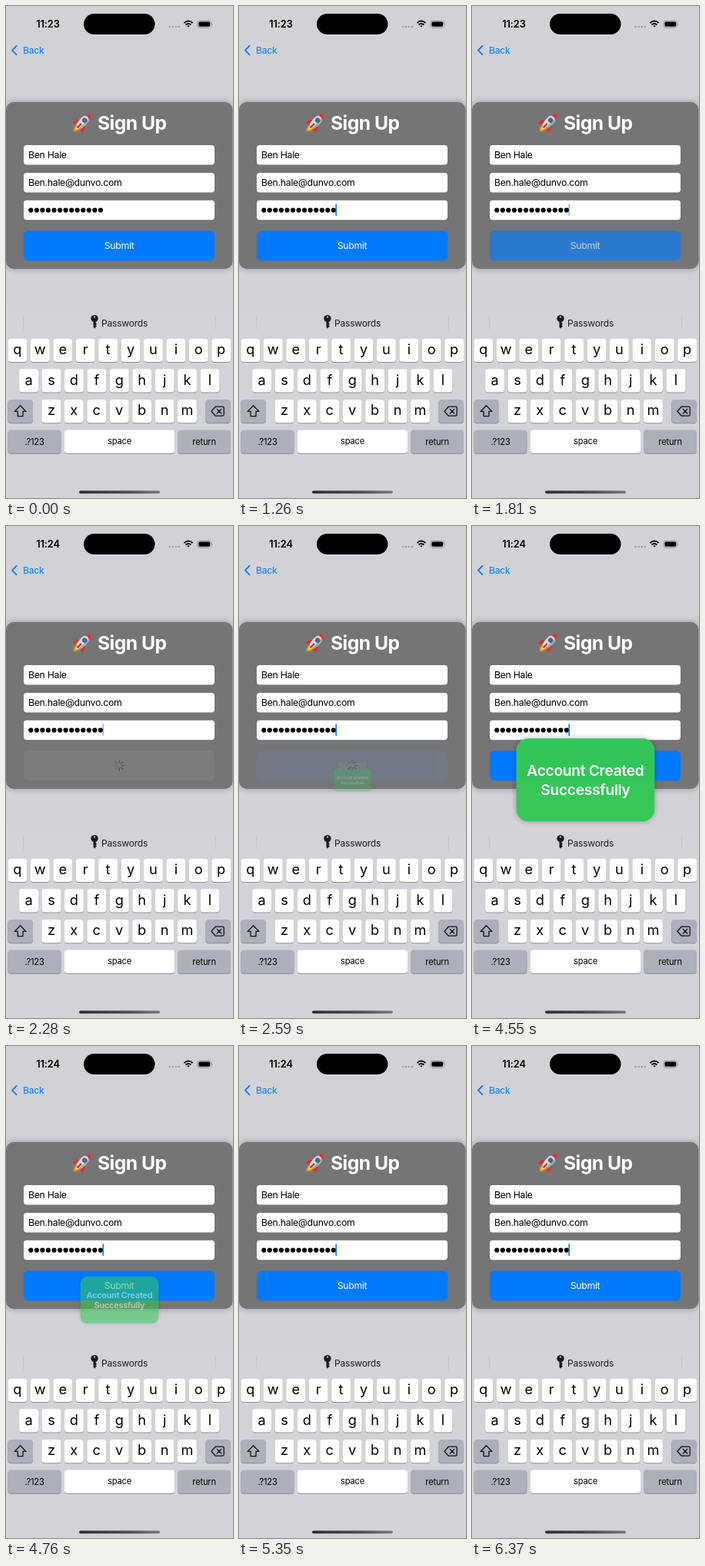
An HTML page that plays this animation: 295x640 px, repeating every 6.41 s.

```html
<!DOCTYPE html>
<html lang="en">
<head>
<meta charset="utf-8">
<title>Sign Up</title>
<style>
  html, body { margin: 0; width: 100%; height: 100%; overflow: hidden; background: #d1d1d6; }
  svg { display: block; width: 100vw; height: 100vh; }
  text { font-family: Inter, "Liberation Sans", sans-serif; font-size: 12.3px; letter-spacing: -.3px; }
  .mid { text-anchor: middle; }
  .white { fill: #fff; }
  .clock { font-size: 12.8px; font-weight: 600; letter-spacing: -.1px; }
  .title { font-size: 24.7px; font-weight: 700; letter-spacing: -.55px; }
  .toast { font-size: 19.5px; font-weight: 600; }
  .letter { font-size: 18.2px; letter-spacing: 0; }
  .label { font-size: 11.2px; letter-spacing: -.2px; }
  .line { fill: none; stroke: #111; stroke-width: 1.3; stroke-linejoin: round; stroke-linecap: round; }
</style>
</head>
<body>
<svg viewBox="0 0 295 640" preserveAspectRatio="none">
  <defs>
    <filter id="shade" x="-20%" y="-20%" width="140%" height="140%">
      <feDropShadow dx="0" dy="0" stdDeviation="4" flood-opacity=".3"/>
    </filter>
    <linearGradient id="bar">
      <stop offset="0" stop-color="#303033"/>
      <stop offset=".6" stop-color="#4a4a4d"/>
      <stop offset="1" stop-color="#7c7c80"/>
    </linearGradient>
  </defs>
  <rect width="295" height="640" fill="#d1d1d6"/>
  <rect y="391" width="295" height="249" fill="#d1d3d9"/>

  <!-- status bar -->
  <text id="clock" class="clock mid" x="54.5" y="28">11:23</text>
  <rect x="101" y="10" width="92.5" height="27" rx="13.5"/>
  <g id="signal" fill="#a3a3a8"></g>
  <g fill="none" stroke="#000" stroke-width="1.9">
    <path d="M231.4 22.1Q237 16.9 242.6 22.1"/>
    <path d="M233.5 24.5Q237 21.3 240.5 24.5"/>
    <path d="M235.3 25.9L237 27.6L238.7 25.9Q237 24.6 235.3 25.9Z" fill="#000" stroke="none"/>
  </g>
  <rect x="249" y="19.2" width="17.6" height="9" rx="2.8" fill="none" stroke="#8b8b8f" stroke-width=".9"/>
  <rect x="250.4" y="20.6" width="14.8" height="6.2" rx="1.7"/>
  <path d="M268 22.2Q269.6 23.7 268 25.2Z" fill="#8b8b8f"/>

  <path d="M13.6 51.8L8 57.6L13.6 63.4" fill="none" stroke="#007aff" stroke-width="1.8" stroke-linecap="round" stroke-linejoin="round"/>
  <text x="22" y="62" fill="#007aff">Back</text>

  <!-- form card -->
  <rect x="0" y="125" width="294.5" height="217" rx="10" fill="#747475" filter="url(#shade)"/>
  <g transform="translate(99.6 151.3) rotate(45)">
    <path d="M-3.2 8Q-4.6 13 0 16.5Q4.6 13 3.2 8Z" fill="#f59a23"/>
    <path d="M-1.7 8Q-2.2 11.5 0 13.5Q2.2 11.5 1.7 8Z" fill="#ffe05c"/>
    <path d="M-4 0Q-9.3 3 -9 10.5L-3.4 7.4ZM4 0Q9.3 3 9 10.5L3.4 7.4Z" fill="#d5342f"/>
    <path d="M0 -16Q-8 -7 -4 8H4Q8 -7 0 -16Z" fill="#d9dde1"/>
    <path d="M0 -16Q8 -7 4 8H1.4Q4 -5 0 -16Z" fill="#a4abb2"/>
    <path d="M0 -16Q-3.5 -12 -4.6 -8.6Q0 -10.4 4.6 -8.6Q3.5 -12 0 -16Z" fill="#d5342f"/>
    <circle cy="-3.6" r="2.7" fill="#2f6fa8" stroke="#59636c" stroke-width="1"/>
    <path d="M-1 2.5H1V10H-1Z" fill="#b62a28"/>
  </g>
  <text class="title white" x="119" y="160.7">Sign Up</text>
  <g class="white">
    <rect x="23" y="181" width="248" height="25.5" rx="4"/>
    <rect x="23" y="217" width="248" height="25.5" rx="4"/>
    <rect x="23" y="252.7" width="248" height="25.5" rx="4"/>
  </g>
  <text x="29" y="198.3">Ben Hale</text>
  <text x="29" y="234.3">Ben.hale@dunvo.com</text>
  <g id="dots"></g>
  <rect id="caret" x="125.4" y="257.3" width="1.6" height="15.6" rx=".7" fill="#0a78f5"/>

  <g id="idle">
    <rect x="23" y="292.3" width="248" height="39" rx="6" fill="#007aff"/>
    <text class="mid white" x="147" y="316.3">Submit</text>
  </g>
  <g id="busy">
    <rect x="23" y="292.3" width="248" height="39" rx="6" fill="#7c7c7d"/>
    <g id="spinner" transform="translate(147 311.5)" stroke="#4c4c4e" stroke-width="1.7" stroke-linecap="round"></g>
  </g>

  <!-- keyboard -->
  <path d="M22.5 403V421M272.5 403V421" stroke="#c2c4ca"/>
  <circle cx="115" cy="406.6" r="4.7" fill="#1c1c1e"/>
  <path d="M113.5 410H116.5V412L118 413.4L116.5 414.8L118 416.2L115.2 419.4L113.5 417.8Z" fill="#1c1c1e"/>
  <circle cx="115" cy="404.6" r="1.1" fill="#d1d3d9"/>
  <text x="124" y="417" style="font-size:12px;letter-spacing:-.2px" fill="#1c1c1e">Passwords</text>
  <g id="keys"></g>
  <path class="line" d="M18.6 519.8L26 527.4H22V533.6H15.2V527.4H11.2Z"/>
  <path class="line" d="M272.3 521.2H281.5Q283.2 521.2 283.2 522.9V531.5Q283.2 533.2 281.5 533.2H272.3L266.8 527.2ZM274.3 524.4L279.7 530M279.7 524.4L274.3 530"/>
  <rect x="95" y="630.4" width="105" height="3.8" rx="1.9" fill="url(#bar)"/>

  <g id="toast">
    <rect x="-91.3" y="-54.8" width="182.6" height="109.6" rx="16" fill="#34c759" filter="url(#shade)"/>
    <text class="toast mid white" x="0" y="-5">Account Created</text>
    <text class="toast mid white" x="0" y="20">Successfully</text>
  </g>
</svg>
<script>
const LOOP = 6410;
// the picture only advances at these moments
const STEPS = [0, 120, 240, 780, 900, 1140, 1260, 1690, 1800, 1920, 2040, 2160, 2280,
  2380, 2490, 2600, 2720, 2840, 2970, 3210, 3320, 3870, 3980, 4220, 4340,
  4550, 4660, 4760, 4880, 5000, 5240, 5350, 5530, 5900, 6010, 6250, 6370];
const CARET_ON = [120, 1140, 2280, 3210, 4220, 5240, 6250];
const CARET_OFF = [780, 1800, 2910, 3870, 4880, 5900];

const $ = id => document.getElementById(id);
const clamp = v => Math.min(1, Math.max(0, v));
const ease = (t, from, to) => {
  const p = clamp((t - from) / (to - from));
  return p * p * (3 - 2 * p);
};

function add(parent, tag, attrs, text) {
  const el = document.createElementNS("http://www.w3.org/2000/svg", tag);
  for (const name in attrs) el.setAttribute(name, attrs[name]);
  if (text) el.textContent = text;
  parent.appendChild(el);
  return el;
}

function addKey(x, y, width, fill, label, style, base) {
  const box = { x, width, height: 30.3, rx: 3.8 };
  add($("keys"), "rect", { ...box, y: y + 1, fill: "#8d9096" });
  add($("keys"), "rect", { ...box, y, fill });
  if (label) add($("keys"), "text", { x: x + width / 2, y: y + base, class: "mid " + style }, label);
}

const PITCH = 29.42, KEY = 24.8, GRAY = "#abb0ba";
[["qwertyuiop", 2.5, 432.8], ["asdfghjkl", 17.2, 472.3], ["zxcvbnm", 46.5, 511.9]]
  .forEach(([row, left, top]) => [...row].forEach((c, i) =>
    addKey(left + i * PITCH, top, KEY, "#fff", c, "letter", 20.2)));
addKey(2.5, 511.9, 32.5, GRAY);
addKey(259.3, 511.9, 32.5, GRAY);
addKey(2.5, 551.4, 69, GRAY, ".?123", "label", 19.4);
addKey(76, 551.4, 143, "#fff", "space", "label", 18.6);
addKey(223.3, 551.4, 68.7, GRAY, "return", "label", 19.4);

for (let i = 0; i < 13; i++) add($("dots"), "circle", { cx: 32.3 + 7.55 * i, cy: 265.6, r: 3.1 });
for (let i = 0; i < 4; i++) add($("signal"), "circle", { cx: 212.8 + 4 * i, cy: 27, r: 1.35 });

const spokes = Array.from({ length: 8 }, (_, i) =>
  add($("spinner"), "line", { y1: -3.4, y2: -6.6, transform: `rotate(${i * 45})` }));

function draw(time) {
  const t = STEPS.filter(s => s <= time).pop();
  const fades = list => list.reduce((sum, s) => sum + clamp((t - s + 60) / 120), 0);
  $("caret").setAttribute("opacity", fades(CARET_ON) - fades(CARET_OFF));
  $("clock").textContent = t < 1920 ? "11:23" : "11:24";

  const shown = ease(t, 2310, 2840);
  const busy = ease(t, 1640, 2200) - shown;
  $("idle").setAttribute("opacity", 1 - busy);
  $("busy").setAttribute("opacity", busy);
  const head = Math.floor(t / 114);
  spokes.forEach((s, i) => s.setAttribute("opacity", 0.25 + 0.6 * ((i - head % 8 + 15) % 8) / 7));

  const size = shown - ease(t, 4510, 5050);
  $("toast").setAttribute("opacity", size > 0.04 ? size : 0);
  $("toast").setAttribute("transform", `translate(147.4 330.3) scale(${Math.max(size, 0.01)})`);
}

const start = performance.now();
function tick() {
  draw((performance.now() - start) % LOOP);
  requestAnimationFrame(tick);
}
tick();
</script>
</body>
</html>
```
